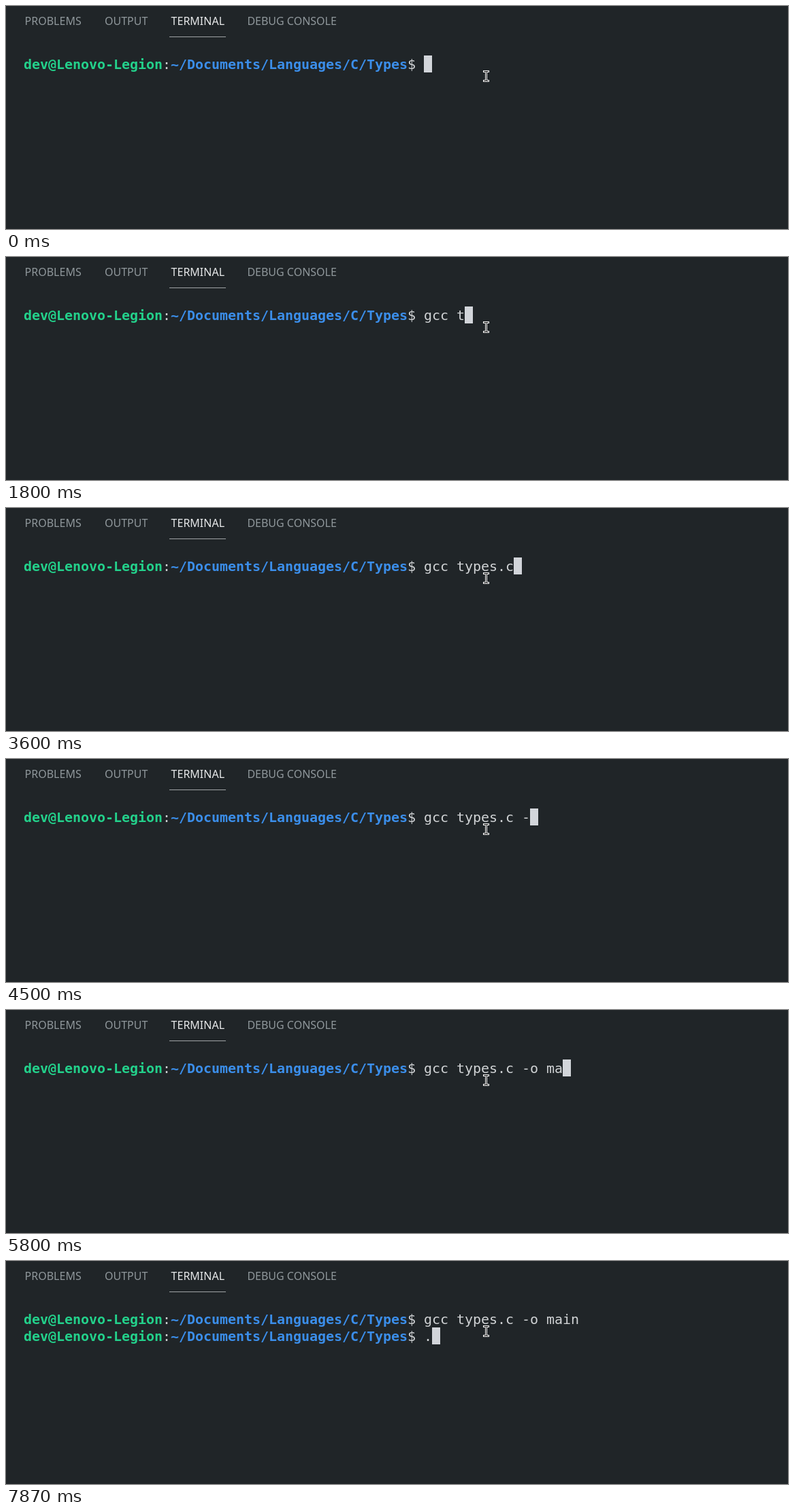
An HTML page that plays this animation: 1149x329 px, repeating every 8 s.

```html
<!DOCTYPE html>
<html lang="en">
<head>
<meta charset="utf-8">
<title>Terminal</title>
<style>
  html, body { margin: 0; width: 100%; height: 100%; overflow: hidden; background: #202528; }
  body { position: relative; }
  body > * { position: absolute; white-space: pre; }
  .tab { top: 10px; font: 16px/24px "Noto Sans", sans-serif; color: #8f979b; }
  .active { color: #e7e9ea; }
  #underline { left: 240px; top: 45px; width: 83px; height: 1px; background: #a0a4a6; }
  /* Every character takes one 12px cell of the terminal grid. */
  .line {
    left: 26px; height: 25px; color: #d0d3d5;
    font: 20px/25px "DejaVu Sans Mono", monospace;
    letter-spacing: calc(12px - 1ch);
    font-variant-ligatures: none;
  }
  .line b { letter-spacing: calc(12px - 1ch); }
  .user { color: #23d18b; }
  .path { color: #3b8eea; }
  #caret { width: 12px; height: 25px; background: #d2d5da; }
  #mouse { left: 701px; top: 95px; }
</style>
</head>
<body>
  <div class="tab" style="left:27.6px">PROBLEMS</div>
  <div class="tab" style="left:145px">OUTPUT</div>
  <div class="tab active" style="left:242.6px">TERMINAL</div>
  <div class="tab" style="left:354.4px">DEBUG CONSOLE</div>
  <div id="underline"></div>

  <div class="line" style="top:74px"><span class="prompt"></span><span class="typed"></span></div>
  <div class="line" style="top:99px"><span class="prompt"></span><span class="typed"></span></div>
  <div id="caret"></div>

  <svg id="mouse" width="9" height="17" shape-rendering="crispEdges">
    <path fill="#fff" d="M0 0H9V3H6V14H9V17H0V14H3V3H0Z"/>
    <path fill="#111" d="M1 1H8V2H5V15H8V16H1V15H4V2H1Z"/>
  </svg>

<script>
const LOOP = 8000, CELL = 12, ROW = 25, LEFT = 26, TOP = 73, PROMPT_CELLS = 49;
const COMMAND = "gcc types.c -o main";
const KEY_TIMES = [500, 830, 1100, 1400, 1800, 2130, 2400, 2670, 2870, 3170,
                   3600, 4230, 4500, 4830, 5030, 5630, 5800, 5970, 6070];
const ENTER = 6830, NEW_PROMPT = 6870, NEXT_KEY = 7870;
const PROMPT = '<b class="user">dev@Lenovo-Legion</b>:' +
               '<b class="path">~/Documents/Languages/C/Types</b>$ ';

const prompts = document.querySelectorAll(".prompt");
const typed = document.querySelectorAll(".typed");
const caret = document.getElementById("caret");
prompts.forEach(prompt => prompt.innerHTML = PROMPT);

function draw(t) {
  const count = KEY_TIMES.filter(time => time <= t).length;
  const row = t >= ENTER ? 1 : 0;
  const hasPrompt = !row || t >= NEW_PROMPT;
  const nextText = t >= NEXT_KEY ? "." : "";
  const column = hasPrompt ? PROMPT_CELLS + (row ? nextText.length : count) : 0;

  typed[0].textContent = COMMAND.slice(0, count);
  typed[1].textContent = nextText;
  prompts[1].style.display = row && hasPrompt ? "" : "none";
  caret.style.left = LEFT + column * CELL + "px";
  caret.style.top = TOP + row * ROW + "px";
}

const start = performance.now();
function frame() {
  draw((performance.now() - start) % LOOP);
  requestAnimationFrame(frame);
}
frame();
</script>
</body>
</html>
```
